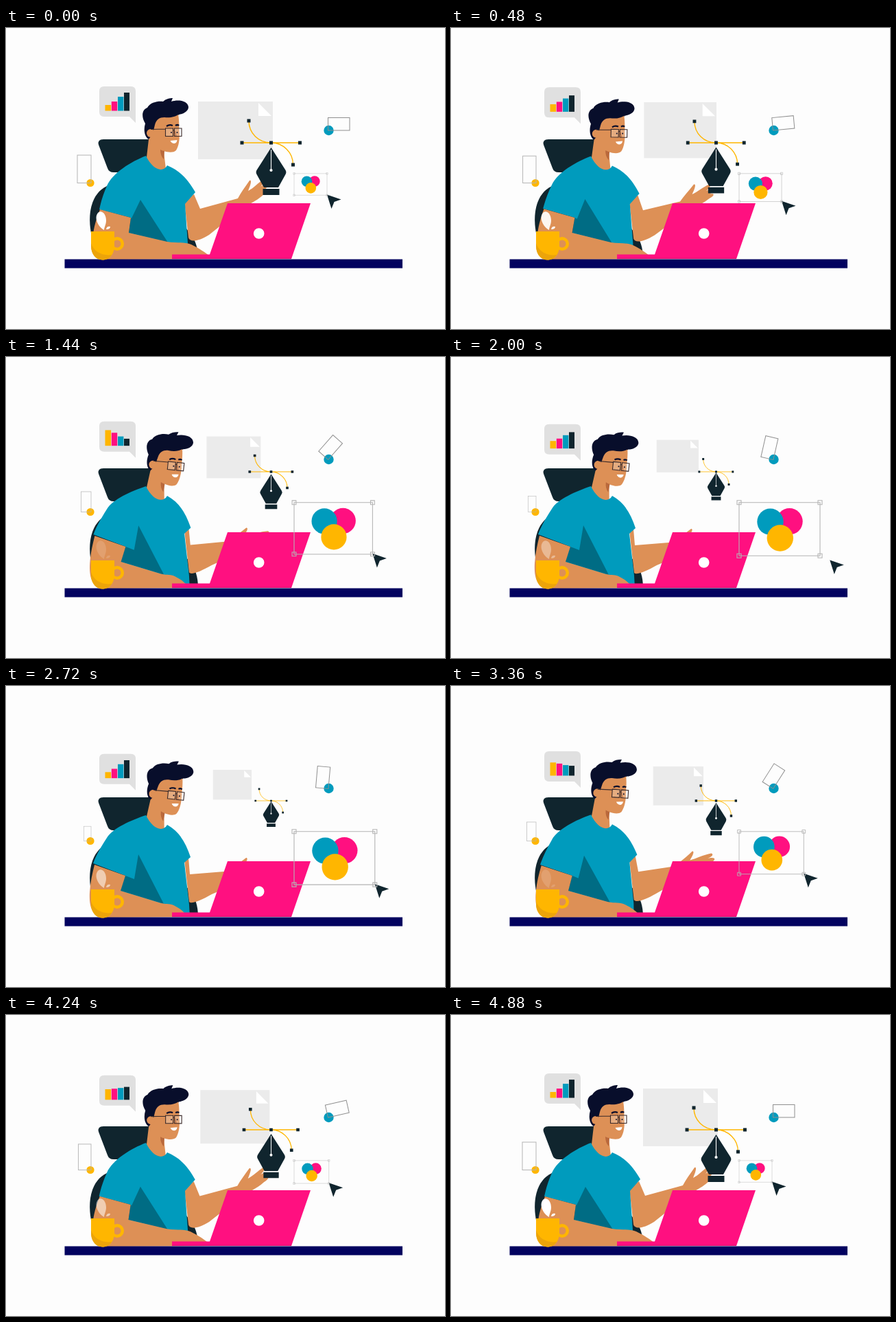
An HTML page for the animation above (4960 ms loop, 640 by 438 pixels).

```html
<!DOCTYPE html>
<html lang="en">
<head>
<meta charset="utf-8">
<title>Designer at work</title>
<style>
  html, body { margin: 0; width: 100%; height: 100%; overflow: hidden; background: #fdfdfd; }
  svg { display: block; width: 640px; height: 438px; }
  .dark { fill: #10252e; }
  .navy { fill: #080e2b; }
  .skin { fill: #dd9056; }
  .blue { fill: #009bbd; }
  .pink { fill: #ff1080; }
  .gold { fill: #ffb600; }
  .white { fill: #fff; }
  .wire { fill: none; stroke: #b4b4b4; }
  .curve { fill: none; stroke: #ffb600; stroke-width: 1.4; }
  .specs { fill: none; stroke: #3a2a2a; stroke-width: 1.1; }
</style>
</head>
<body>
<svg viewBox="0 0 640 438">
  <!-- chair -->
  <path class="dark" d="M142 162H212V200L190 210H157Q150 210 148 204L135 170Q133 162 142 162Z"/>
  <path class="dark" d="M162 226C122 230 116 275 127 310L140 336H280C280 320 276 308 268 298L220 240Z"/>

  <!-- speech bubble with bar chart -->
  <g id="bubble">
    <path fill="#e0e0e0" d="M143 85H182Q189 85 189 92V138L180 129H143Q136 129 136 122V92Q136 85 143 85Z"/>
    <g id="bars">
      <rect class="gold" x="144.5" width="8.6"/>
      <rect class="pink" x="153.8" width="8.4"/>
      <rect class="blue" x="163" width="8.4"/>
      <rect class="dark" x="172" width="8"/>
    </g>
  </g>

  <!-- wire shapes -->
  <circle class="gold" cx="123" cy="225.5" r="5.6"/>
  <rect id="tall" class="wire" x="104" y="185" width="20" height="40.5"/>
  <circle class="blue" cx="470.5" cy="149" r="7.2"/>
  <rect id="spin" class="wire" style="stroke: #8f8f8f" x="469.5" y="130.5" width="31.5" height="18.5"/>

  <!-- sheet -->
  <g id="sheet">
    <rect fill="#ebebeb" x="280" y="107" width="109" height="84"/>
    <path class="white" d="M368 109V128H387Z"/>
  </g>

  <path id="reach" class="skin"/>

  <!-- pen tool -->
  <g id="handles">
    <path class="curve" d="M344 167H429M354 135C354 153 368 167 386.5 167C404 167 418.5 181 418.5 199"/>
    <path class="dark" d="M341.5 164.5h5v5h-5zM426 164.5h5v5h-5zM384 164.5h5v5h-5zM351.5 132.5h5v5h-5zM416 196.5h5v5h-5z"/>
  </g>
  <g id="nib">
    <path class="dark" d="M386.5 174L407 206Q409.500 209.500 407.500 213L397 232H376L365.500 213Q363.500 209.500 366 206ZM374.500 234h24v9h-24z"/>
    <path d="M386.5 177V207" stroke="#fff" stroke-width="1.1"/>
    <circle class="white" cx="386.5" cy="207" r="2.1"/>
  </g>

  <!-- head -->
  <g id="head">
    <path class="navy" d="M210 163C202 160 200 149 203 139C197 129 198 119 206 116C210 108 222 106 229 107C233 103 239 102 243 102L241 107C250 104 265 105 266 115C266 121 259 125 252 126L240 140L220 160Z"/>
    <path class="skin" d="M217 141C219 133 224 130 231 130C240 131 247 129 251 126C253 136 252 146 253 154C253 162 252 172 248 178C244 182 236 181 230 179L234 214H202L208 162Q214 156 217 141Z"/>
    <circle class="skin" cx="211" cy="153" r="6"/>
    <path fill="#b9683b" d="M225 177Q228 179 231 179L230 191Q225 186 225 177Z"/>
    <path d="M234 143Q238 140 243 142M247 142Q250 140 252 142" fill="none" stroke="#080e2b" stroke-width="2.2"/>
    <path class="white" opacity=".25" d="M232.5 146h11v11.500h-11zM245.500 146h10.500v11.500h-10.500z"/>
    <path d="M246 150L248 157H245" fill="none" stroke="#b9683b"/>
    <circle class="navy" cx="241" cy="152" r="1"/>
    <circle class="navy" cx="249.5" cy="152" r="1"/>
    <path class="specs" d="M211 147.500L232.500 147M232.500 146h11v11.500h-11zM245.500 146h10.500v11.500h-10.500zM243.500 149h2"/>
    <path class="white" d="M239.500 164L249.500 163C249 169.500 242 169.500 239.500 164Z"/>
  </g>

  <!-- body -->
  <path id="shirt" class="blue"/>
  <path id="shade" fill="#006c84"/>
  <path id="arm" class="skin"/>

  <!-- selected circles and pointer -->
  <g id="pick">
    <circle class="pink" cx="73.5" cy="27.5" r="19.2"/>
    <circle class="blue" cx="45.5" cy="28" r="19.2"/>
    <circle class="gold" cx="59.8" cy="51.7" r="19.2"/>
  </g>
  <path id="pointer" class="dark" d="M0 0L20.5 7L10.500 10.500L6.500 20.500Z"/>

  <!-- desk -->
  <rect fill="#02025f" x="85.5" y="336.5" width="492.5" height="13"/>
  <path class="pink" d="M323 255H444L416 336H242V329.5H297Z"/>
  <path d="M242 335.3H416" stroke="#d8106f"/>
  <circle class="white" cx="368.7" cy="299" r="7.8"/>
  <circle cx="162" cy="314" r="7.8" fill="none" stroke="#ffb600" stroke-width="4.5"/>
  <path class="gold" d="M124 296H158V317C158 329 151 337.5 141 337.5C131 337.5 124 329 124 317Z"/>
  <path fill="#eca40a" d="M124 313C128 326 141 332 154 330C151 335 146 337.5 141 337.5C131 337.5 124 329 124 317Z"/>
  <path id="steam" class="white" d="M143 294C134 289 128 276 134 269C139 264 146 270 146 280C146 286 143 290 143 294ZM146 293Q147 288 152 289Q152 293 146 293Z"/>

  <!-- selection frame, above the laptop -->
  <g id="frame" class="wire" stroke-width="1.1">
    <path d="M0 0H118V77.5H0Z"/>
    <path d="M-3 -3h6v6h-6zM115 -3h6v6h-6zM-3 74.5h6v6h-6zM115 74.5h6v6h-6z"/>
  </g>
</svg>

<script>
const LOOP = 4960, STEP = 80;

// Pairs of paths: sitting back, leaning in.
const poses = {
  reach: [
    'M260 252L274 242L283 263L338 248C342 240 348 232 355 222C358 221 358 225 353 237C361 233 368 225 374 221C378 222 376 226 371 231C382 224 385 229 377 235C385 233 383 238 376 242C368 250 355 256 345 262L296 301C280 311 268 312 266 305Z',
    'M260 252L266 250L268 274L318 270C328 266 340 258 350 250C353 250 352 254 346 262C354 261 368 256 382 255C386 256 384 260 374 262C386 260 390 264 380 268C388 268 386 272 376 274C362 278 350 284 340 286L300 303C284 312 270 318 267 314Z'],
  shirt: [
    'M204 186C183 194 155 211 147 230C141 243 138 255 136 264L182 276L180 299L235 336L264 336L265 313L261 256L276 239C266 222 255 208 235 200C228 212 213 205 204 186Z',
    'M204 188C183 195 155 207 147 221C138 235 131 247 127 258L174 276L167 298L240 336L268 336L267 318L260 257L269 249C262 228 253 212 235 202C228 214 213 207 204 188Z'],
  shade: [
    'M196 250L183 277L182 276L179 298L236 312Z',
    'M193 245L187 281L174 276L167 298L230 317Z'],
  arm: [
    'M137 264L182 276L179 298L235 311C248 313 260 311 270 315C282 321 290 326 298 333L298 336L142 337C128 334 124 318 127 300C129 285 133 275 137 264Z',
    'M129 260L174 276L167 298L226 316C234 318 240 316 246 320C254 324 257 327 261 331L261 336L140 337C124 334 121 318 122 300C123 285 126 272 129 260Z']
};
// Resting height and change of each bar.
const barSpan = [[8.5, 16.5], [13.5, 6.3], [20.5, -8], [26.5, -18.8]];
// Time and opacity.
const steamKeys = [[0, 1], [400, .97], [880, .65], [1440, .15], [1620, .1], [2400, .65],
  [2720, .55], [3360, .15], [3520, .1], [4240, .55], [4880, 1], [LOOP, 1]];

const $ = id => document.getElementById(id);
const lerp = (a, b, p) => a + (b - a) * p;
const clamp = x => Math.min(1, Math.max(0, x));
const smooth = x => (x = clamp(x), x * x * (3 - 2 * x));
const pingPong = (t, span) => 1 - Math.abs(t % span / span * 2 - 1);
const move = (id, value) => $(id).setAttribute('transform', value);
const scaleAt = (id, x, y, s) => move(id, `translate(${x} ${y}) scale(${s}) translate(${-x} ${-y})`);

function morph([from, to], p) {
  const ends = to.match(/\d+/g);
  let i = 0;
  return from.replace(/\d+/g, n => lerp(+n, +ends[i++], p).toFixed(2) + ' ');
}

function track(keys, t) {
  const i = keys.findIndex(k => k[0] > t);
  const [t0, v0] = keys[i - 1], [t1, v1] = keys[i];
  return lerp(v0, v1, (t - t0) / (t1 - t0));
}

function draw(t) {
  const cycle = pingPong(t, LOOP);
  const shrink = smooth(cycle ** 1.15);
  const lean = Math.min(smooth(t / 1670), smooth((4450 - t) / 1790));
  const swap = smooth(pingPong(t, LOOP / 2) ** 1.5);

  move('bubble', `translate(0 ${14 * smooth(cycle)})`);
  [...$('bars').children].forEach((bar, i) => {
    const h = barSpan[i][0] + barSpan[i][1] * swap;
    bar.setAttribute('y', 120.5 - h);
    bar.setAttribute('height', h);
  });

  scaleAt('tall', 124, 225.5, 1 - .49 * shrink);
  move('spin', `rotate(${-88 * shrink} 470 149)`);
  scaleAt('sheet', 325, 138, 1 - .5 * shrink);
  scaleAt('handles', 386.5, 167, 1 - .48 * shrink);
  scaleAt('nib', 386.5, 161, 1 - .48 * shrink);

  for (const id in poses) $(id).setAttribute('d', morph(poses[id], lean));
  move('head', `translate(0 ${4.2 * lean}) rotate(${6.3 * lean} 215 185)`);

  const size = lerp(48, 118, lean) / 118;
  const box = `translate(420 211.8) scale(${size})`;
  move('pick', box);
  move('frame', box);
  const nudge = 15 * Math.sin(Math.PI * clamp((t - 1680) / 560)) ** 2;
  move('pointer', `translate(${420 + 118 * size + nudge} ${211.3 + 77 * size + nudge * .5})`);

  $('steam').setAttribute('opacity', track(steamKeys, t));
}

const start = performance.now();
function tick() {
  const t = (performance.now() - start) % LOOP;
  draw(Math.floor(t / STEP) * STEP);
  requestAnimationFrame(tick);
}
tick();
</script>
</body>
</html>
```
